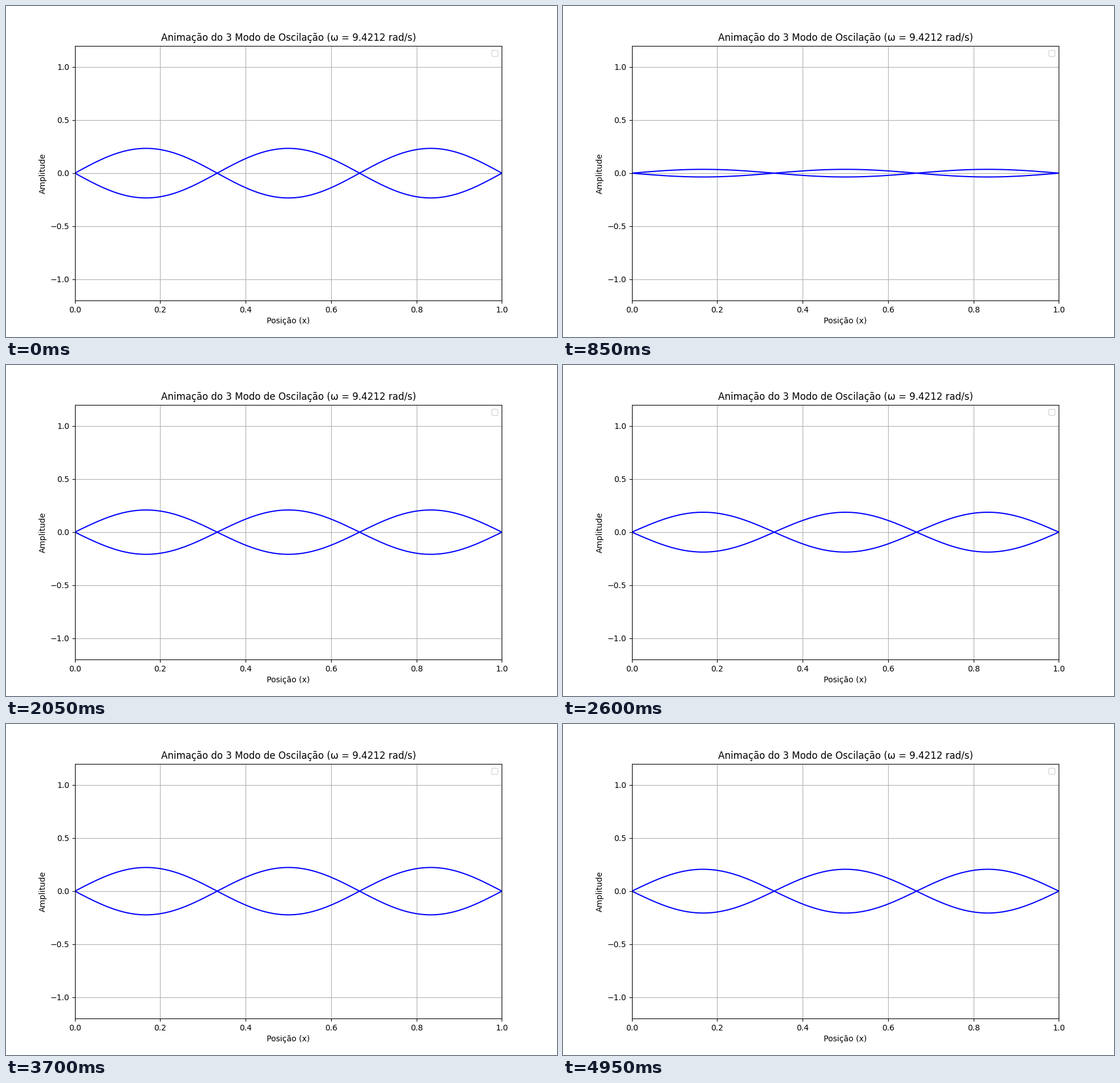
Recreate the animation shown at these times as a matplotlib script. Size 966 by 580 pixels, loop 5000 ms.

```python
import numpy as np
import matplotlib.pyplot as plt
from matplotlib.animation import FuncAnimation

MODE = 3
OMEGA = 9.4212      # rad/s
AMPLITUDE = 0.2335
FRAMES = 100
INTERVAL = 50       # ms

x = np.linspace(0, 1, 100)
shape = AMPLITUDE * np.sin(MODE * np.pi * x)

fig, ax = plt.subplots(figsize=(9.66, 5.8), dpi=100)
ax.set_xlim(0, 1)
ax.set_ylim(-1.2, 1.2)
ax.set_title(f"Animação do {MODE} Modo de Oscilação (ω = {OMEGA:.4f} rad/s)")
ax.set_xlabel("Posição (x)")
ax.set_ylabel("Amplitude")
ax.grid(True)
ax.legend(handles=[], loc="upper right")

upper, = ax.plot(x, shape, color="blue")
lower, = ax.plot(x, -shape, color="blue")


def update(frame):
    t = frame * INTERVAL / 1000
    y = shape * np.cos(OMEGA * t)
    upper.set_ydata(y)
    lower.set_ydata(-y)
    return upper, lower


anim = FuncAnimation(fig, update, frames=FRAMES, interval=INTERVAL,
                     repeat=True, repeat_delay=0)
plt.show()
```
